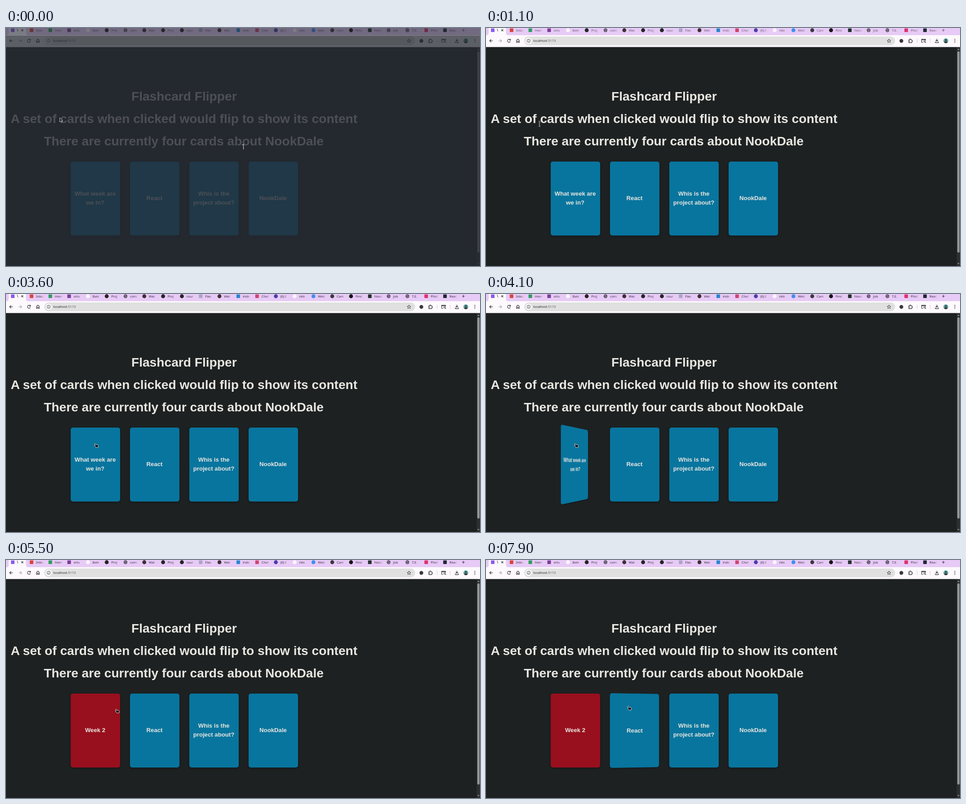
Recreate the animation shown at these times as an HTML page. Size 1055x531 px, loop 8 s.

```html
<!DOCTYPE html>
<html lang="en">
<head>
<meta charset="utf-8">
<title>Flashcard Flipper</title>
<style>
  html, body { margin: 0; width: 100%; height: 100%; overflow: hidden; background: #1d2122; }
  #stage { position: relative; width: 1055px; height: 531px; overflow: hidden; }
  svg { position: absolute; left: 0; top: 0; }
  .title { font: bold 28.16px "Liberation Sans", Arial, sans-serif; fill: #e8e6e0; text-anchor: middle; }
  .small { font: 7.4px "Noto Sans", "Open Sans", sans-serif; }
  .card {
    position: absolute; top: 297.5px; width: 110px; height: 165px; border-radius: 5px;
    box-shadow: 0 2px 4px rgba(0, 0, 0, .3); color: #e8e6e0;
    font: bold 13.2px/19.8px "Liberation Sans", Arial, sans-serif;
    display: flex; align-items: center; justify-content: center;
    text-align: center; white-space: pre;
  }
</style>
</head>
<body>
<div id="stage">
  <svg id="back" width="1055" height="531"></svg>
  <div id="cards"></div>
  <svg id="front" width="1055" height="531"></svg>
</div>
<script>
const $ = id => document.getElementById(id);
const LOOP = 8000, STEP = 100;
const BLUE = "#08759e", RED = "#980f1d", STRIP = "#e7cbf6", INK = "#2b2a2c";

// Browser tabs: icon shape and colour, label
const tabs = [
  ["s", "#8b5cf0", ""], ["s", "#d94438", "Inbo"], ["s", "#2f9e5f", "Hom"], ["s", "#7d3f98", "orlu"],
  ["c", "#faf5fd", "Ibek"], ["c", "#242424", "Proj"], ["g", "", "cons"], ["c", "#3b3033", "Wat"],
  ["c", "#242424", "Proj"], ["c", "#242424", "cour"], ["s", "#a9a6c4", "Flas"], ["c", "#3b3033", "Wat"],
  ["s", "#2787d0", "inde"], ["s", "#d2436b", "Chat"], ["c", "#4a3fa8", "(6) I"], ["c", "#faf5fd", "nilo"],
  ["c", "#3f8ff0", "Web"], ["c", "#3a3a3e", "Care"], ["c", "#141414", "Find"], ["s", "#20302a", "Nook"],
  ["g", "", "Job"], ["g", "", "T.E."], ["s", "#e1306c", "Phot"], ["s", "#1c2a33", "Reac"]
];

const rect = (x, y, w, h, fill, more = "") =>
  `<rect x="${x}" y="${y}" width="${w}" height="${h}" fill="${fill}" ${more}/>`;
const circle = (x, y, r, fill, more = "") =>
  `<circle cx="${x}" cy="${y}" r="${r}" fill="${fill}" ${more}/>`;
const line = (d, color = INK, width = 1.1) =>
  `<path d="${d}" fill="none" stroke="${color}" stroke-width="${width}" stroke-linejoin="round"/>`;
const text = (x, y, str, cls, more = "") => `<text x="${x}" y="${y}" class="${cls}" ${more}>${str}</text>`;

function tabIcon(kind, color, x) {
  if (kind === "s") return rect(x - 4, 1, 8, 8, color, 'rx="1"');
  if (kind === "c") return circle(x, 5, 4.4, color);
  return circle(x, 5, 4.2, "#4d4853") +
    line(`M${x - 2.6} 3.6h2.8l1.2-1.4M${x - 2} 6.6h2l.6 1.6M${x + 1.6} 5.4h1.8`, STRIP, 1);
}

function tabStrip() {
  let out = rect(0, 0, 1055, 17, STRIP) +
    `<path d="M0 16.5Q6 16.5 6 11V0H44.5V11Q44.5 16.5 50 16.5Z" fill="#fdf9fd"/>`;
  let labels = "", fades = "";
  tabs.forEach(([kind, color, label], i) => {
    const x = 15 + i * 41.83;
    out += tabIcon(kind, color, x);
    if (!i) return;
    labels += text(x + 10, 7.8, label, "small");
    fades += rect(x + 20, 0, 9, 12, "url(#fade)");
  });
  return out + `<g id="labels">${labels}${fades}${line("M1015 5h6M1018 2v6", "currentColor")}</g>` +
    line("M25 1.5l1.5 6", INK, .9) + line("M34 2.8l4.4 4.4m0-4.4l-4.4 4.4", INK);
}

function toolbar() {
  return rect(0, 16, 1055, 26.5, "#fdf9fd") +
    rect(85, 19, 825.5, 19.5, "#dfe0df", 'rx="9.75"') +
    line("M15.2 28.5H8.2m3.3-3.4l-3.4 3.4 3.4 3.4") +
    line("M27.8 28.5h7m-3.3-3.4l3.4 3.4-3.4 3.4", "#a9a5aa") +
    line("M54 26.6A3.4 3.4 0 1 0 54.3 29.8M54.5 24.6v2.6h-2.6") +
    line("M67.8 32.2v-4.8l3.2-2.6 3.2 2.6v4.8h-2.1v-2.8h-2.2v2.8z") +
    circle(95, 28.5, 6.8, "#fbfbfb") +
    circle(95, 28.5, 3.6, "none", `stroke="${INK}" stroke-width=".9"`) +
    line("M95 28v2.3M95 26.4v.9", INK, .9) +
    text(105, 31.2, 'localhost<tspan fill="#5a595c">:5173</tspan>', "small", `fill="${INK}"`) +
    line("M897 24.6l1.2 2.7 2.9.2-2.2 1.9.7 2.9-2.6-1.5-2.6 1.5.7-2.9-2.2-1.9 2.9-.2z", INK, .9) +
    circle(924.5, 28.7, 4.2, "#39363d") +
    line("M941 26h2.4v-1.4h2V26h2.4v2.2h1.3v2h-1.3v2.4H941v-2.2h1.2v-2H941z") +
    line("M959.5 24v9M988.5 24v9", "#dcc3e8", 1) +
    line("M973 32h-3.4v-7h8.8v3M969.6 26.4h8.8") +
    circle(976.2, 30, 1.7, "none", `stroke="${INK}"`) + line("M977.4 31.2l1.8 1.8") +
    line("M1003.5 24v5.6m-2.7-2.6l2.7 2.7 2.7-2.7M1000 30v2.6h7V30") +
    circle(1023.5, 28.5, 5.4, "#5aa6a4") +
    circle(1023.5, 27, 1.9, "#3d3433") +
    `<path d="M1019.8 32.4a3.8 3.6 0 0 1 7.4 0 5.4 5.4 0 0 1-7.4 0z" fill="#3d3433"/>` +
    [25.3, 28.5, 31.7].map(y => circle(1043.5, y, .95, INK)).join("");
}

function page() {
  return rect(0, 42, 1055, 489, "#1d2122") +
    text(396.3, 162, "Flashcard Flipper", "title") +
    text(396.3, 211.8, "A set of cards when clicked would flip to show its content", "title") +
    text(395.5, 261.6, "There are currently four cards about NookDale", "title") +
    rect(1047.5, 42, 7.5, 489, "#2c2f30") +
    rect(1049, 52, 5, 449, "#969695", 'rx="2.5"') +
    `<path d="M1049 49h5l-2.5-3zM1049 524.5h5l-2.5 3z" fill="#969695"/>`;
}

$("back").innerHTML =
  `<defs><linearGradient id="fade"><stop stop-color="${STRIP}" stop-opacity="0"/>` +
  `<stop offset="1" stop-color="${STRIP}"/></linearGradient></defs>` + page() + tabStrip() + toolbar();

const outlined = (d, fill, edge) =>
  `<path d="${d}" fill="${fill}" stroke="${edge}" stroke-width=".9" stroke-linejoin="round"/>`;
const beam = "M-2-5.2H-.6L0-4.6.6-5.2H2M0-4.6V4.6M-2 5.2H-.6L0 4.6.6 5.2H2";
const pointers = {
  arrow: outlined("M0 0V9.2l2.1-2 1.7 3.5 1.5-.7-1.6-3.4h3z", "#131516", "#dcdcdc"),
  beam: line(beam, "#c9c8c5", 2.2) + line(beam, "#111", .9),
  hand: outlined("M-3.6-4.2Q-2.6-5-1.8-4L-.2-1.7 2.6-1.5Q4.4-1.2 4.5.6L4.2 4.2H-1.2L-4-.1Q-4.2-1.4-2.8-1.1L-1.7-.3-3.7-3.1Q-4.1-3.8-3.6-4.2Z", "#101213", "#e4e4e2")
};

$("front").innerHTML = `<g id="dim" fill="#262a32">` +
  rect(0, 0, 1055, 16.5, "#262a32", 'opacity=".6"') +
  rect(0, 16.5, 1055, 26, "#262a32", 'opacity=".74"') +
  rect(0, 42.5, 1055, 488.5, "#262a32", 'opacity=".8"') +
  text(527.5, 271, "1", "", 'font-family="Inter, sans-serif" font-size="15.5" font-weight="300" text-anchor="middle" style="fill:#e4e4e4"') +
  `</g><g id="pointer"></g>`;

// Each card: front text, back text, flip angles by time
const cards = [
  ["What week are\nwe in?", "Week 2", [[3600, 0], [3700, 4], [3900, 15], [4000, 33], [4100, 57],
    [4300, 105], [4400, 150], [4700, 169.5], [4800, 176], [4900, 180]]],
  ["React", "", [[7700, 2], [7900, 6.5]]],
  ["Whis is the\nproject about?", "", []],
  ["NookDale", "", []]
].map(([front, back, flip], i) => {
  const el = document.createElement("div");
  el.className = "card";
  el.style.left = 143.5 + 132 * i + "px";
  $("cards").append(el);
  return { el, front, back, flip };
});

function drawCard({ el, front, back, flip }, t) {
  let angle = 0;
  for (const [at, a] of flip) if (t >= at) angle = a;
  const turned = angle > 90;
  const tilt = turned ? angle - 180 : angle;
  el.textContent = turned ? back : front;
  el.style.background = turned ? RED : BLUE;
  el.style.transform = tilt ? `perspective(600px) rotateY(${tilt}deg)` : "none";
}

// Pointer moves: first step, last step, end point
const moves = [
  [300, 400, 116.5, 199], [600, 900, 100.5, 187.7], [1100, 1500, 193, 318.5],
  [1700, 1900, 201, 338], [4700, 4700, 201.5, 338], [5200, 5300, 231, 338.7],
  [5500, 5800, 297, 332], [6000, 6200, 318, 330.5], [7700, 7700, 319, 330.5]
];

function pointerAt(t) {
  let x = 119.7, y = 200.3;
  for (const [from, to, ex, ey] of moves) {
    if (t < from) break;
    const p = Math.min(1, (t - from + STEP) / (to - from + STEP));
    x += (ex - x) * p;
    y += (ey - y) * p;
  }
  return [x, y];
}

function pointerKind(t, x, y) {
  if (t < 100) return "arrow";
  if (y > 297 && (x - 143.5) % 132 < 110) return "hand";
  return (y > 184 && y < 220) || (y > 234 && y < 270) ? "beam" : "arrow";
}

function draw(ms) {
  const t = Math.floor(ms / STEP) * STEP;
  const focused = (t >= 3600 && t < 7100) || t >= 7500;
  const tone = focused ? "#3f2f48" : "#695873";
  $("labels").setAttribute("fill", tone);
  $("labels").setAttribute("color", tone);
  $("dim").setAttribute("visibility", t < 100 ? "visible" : "hidden");
  cards.forEach(card => drawCard(card, t));
  const [x, y] = pointerAt(t);
  $("pointer").innerHTML = pointers[pointerKind(t, x, y)];
  $("pointer").setAttribute("transform", `translate(${x} ${y})`);
}

const start = performance.now();
function tick() {
  draw((performance.now() - start) % LOOP);
  requestAnimationFrame(tick);
}
tick();
</script>
</body>
</html>
```
